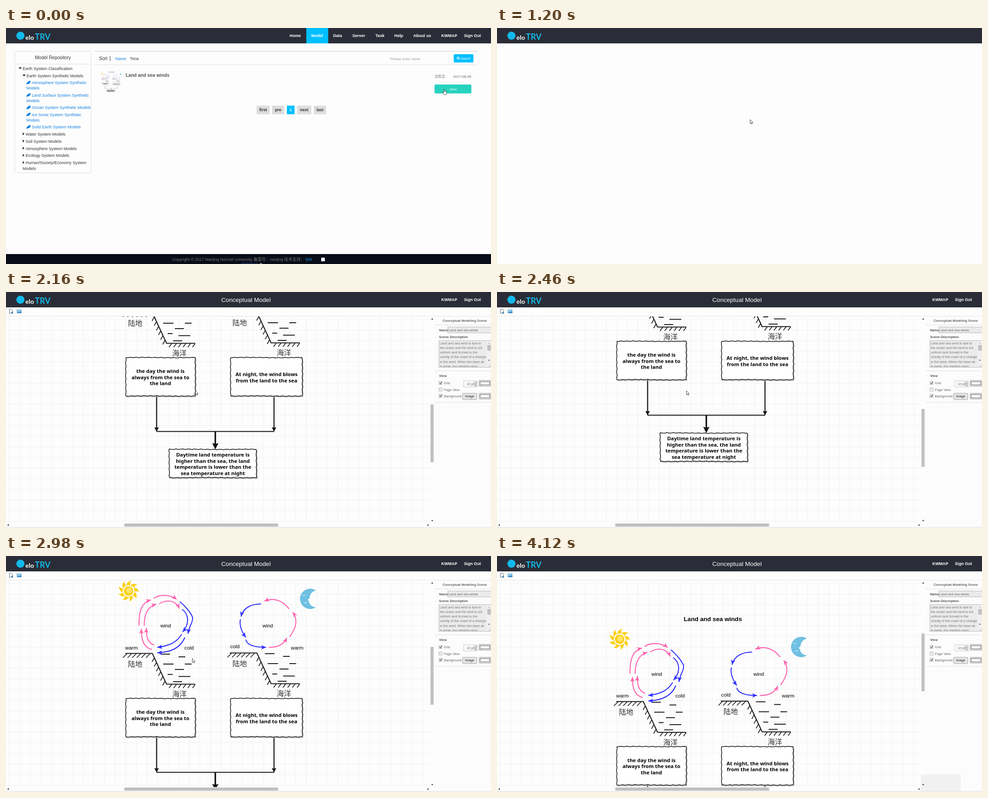
Write an HTML page that moves like this. It is 1074 by 522 pixels and loops after 4590 ms.

```html
<!DOCTYPE html>
<html lang="en">
<head>
<meta charset="utf-8">
<title>Conceptual model viewer</title>
<style>
html, body { margin: 0; width: 100%; height: 100%; overflow: hidden; background: #fdfdfd; }
svg { display: block; width: 1074px; height: 522px; font: 9.05px Arial, "Liberation Sans", "Noto Sans CJK SC", sans-serif; }
.b { font-weight: bold; }
.m { text-anchor: middle; }
.s7 { font-size: 7.35px; }
.s8 { font-size: 7.92px; }
.s10 { font-size: 10.2px; }
.s11 { font-size: 11.3px; }
.s13 { font-size: 13.57px; }
.hand { font: bold 11.3px "Noto Sans", sans-serif; text-anchor: middle; }
.cjk { font: 500 16px "Noto Sans CJK SC", "Noto Sans CJK", sans-serif; }
</style>
</head>
<body>
<svg id="stage" viewBox="0 0 1074 522"></svg>
<script>
const CYAN = '#00bfff', LINK = '#1580e0', PINK = '#ff5fae', BLUE = '#2d2dff';

const text = (x, y, str, cls = '', fill = '#333') => `<text x="${x}" y="${y}" class="${cls}" fill="${fill}">${str}</text>`;
const rect = (x, y, w, h, fill, extra = '') => `<rect x="${x}" y="${y}" width="${w}" height="${h}" fill="${fill}" ${extra}/>`;
const path = (d, fill, stroke = 'none', w = 1, extra = '') =>
  `<path d="${d}" fill="${fill}" stroke="${stroke}" stroke-width="${w}" ${extra}/>`;
const line = (d, stroke, w = 1, extra) => path(d, 'none', stroke, w, extra);
const group = (id, body, extra = '') => `<g id="${id}" ${extra}>${body}</g>`;
const marker = (id, fill) =>
  `<marker id="${id}" markerUnits="userSpaceOnUse" markerWidth="12" markerHeight="12" refX="11" refY="5.5" orient="auto">
   <path d="M11 5.5L0 .7 3 5.5 0 10.3Z" fill="${fill}"/></marker>`;
const times = (n, fn) => Array.from({ length: n }, (_, i) => fn(i)).join('');

const header = rect(0, 0, 1074, 34, '#2a2d37')
  + `<circle cx="32" cy="17" r="9" fill="#12b9ea"/>`
  + `<g font-family="Lato, sans-serif" font-weight="bold"><text x="43" y="26" font-size="14" fill="#fff">elo</text>
     <text x="64" y="26" font-size="18" fill="#12b9ea">TRV</text></g>`;
const account = text(964, 20, 'KWMAP', 'b', '#fff') + text(1014, 20, 'Sign Out', 'b', '#fff');

function listPage() {
  const nav = [['Home', 628], ['Model', 676], ['Data', 724.5], ['Server', 767], ['Task', 818], ['Help', 860], ['About us', 902]];
  const leaves = [
    [124, 'Atmosphere System Synthetic', 'Models'], [151.5, 'Land Surface System Synthetic', 'Models'],
    [179, 'Ocean System Synthetic Models'], [194.5, 'Ice Snow System Synthetic', 'Models'], [222, 'Solid Earth System Models']];
  const closed = ['Water System Models', 'Soil System Models', 'Atmosphere System Models', 'Ecology System Models', 'Human/Society/Economy System'];
  const pages = [['first', 555, 29], ['pre', 589, 27], ['1', 622, 17], ['next', 644.5, 31.5], ['last', 681.5, 27.5]];
  return rect(0, 0, 1074, 522, '#fdfdfd') + header + rect(665, 0, 48.5, 34, CYAN)
    + nav.map(([s, x]) => text(x, 20, s, 'b', '#fff')).join('') + account
    + rect(19.5, 51.5, 169, 269, 'none', 'stroke="#ddd" rx="2"') + line('M20 80H188', '#ddd')
    + text(104, 69, 'Model Repository', 'm s10')
    + path('M28 87h7l-3.5 4zM36.5 103h7l-3.5 4z', '#222')
    + text(37, 92.5, 'Earth System Classification') + text(45.5, 108.5, 'Earth System Synthetic Models')
    + leaves.map(([y, a, b]) => path(`M45 ${y}q1-6 9.5-7.5q0 7-6 7.5q-2 0-3 1z`, LINK)
      + text(57, y, a, '', LINK) + (b ? text(45, y + 12.2, b, '', LINK) : '')).join('')
    + closed.map((s, i) => path(`M37 ${231 + i * 15.8}v6.4l3.6-3.2z`, '#222') + text(43.5, 238 + i * 15.8, s)).join('')
    + text(37, 313.5, 'Models')
    + line('M197 51.5H1044', '#ccc') + line('M197 81.2H1044', '#ddd')
    + text(206, 70.5, 'Sort', 's10') + line('M230.5 62V73', '#333')
    + text(242, 70.5, 'Name', '', LINK) + text(274.5, 70.5, 'Time')
    + text(851, 70.5, 'Please enter name', 's8', '#999')
    + rect(991.5, 58, 43.5, 18.3, CYAN, 'rx="2"') + line('M1002.6 68l2 2', '#fff', 1.5)
    + '<circle cx="1001" cy="66.3" r="2.2" fill="none" stroke="#fff" stroke-width="1.2"/>'
    + text(1007, 69.5, 'Search', '" font-size="6.8', '#fff')
    + '<use href="#diagram" transform="matrix(.104 0 0 .0806 184.4 90.8)"/>'
    + text(265, 107.5, 'Land and sea winds', 'b s10', '#555')
    + text(949, 109.5, '沈知言', 's8', '#777') + text(990, 109.5, '2017-08-05', 's8', '#666')
    + rect(949, 125, 81.5, 19.7, '#27d2bf', 'rx="2"') + text(990, 137.8, 'View', 'm s8', '#fff')
    + pages.map(([s, x, w]) => rect(x, 171.7, w, 19, s === '1' ? CYAN : '#ddd')
      + text(x + w / 2, 184.3, s, 'm b', s === '1' ? '#fff' : '#333')).join('')
    + rect(0, 500, 1074, 22, '#090d18')
    + text(368, 514.5, 'Copyright © 2017 Nanjing Normal University 备案号：nanjing 技术支持：', '', '#777')
    + text(663, 514.5, '506', '', '#1a90e0') + rect(698, 508, 8, 8, '#fff')
    + text(521, 528, '回到顶部', '', '#2a6fc8') + path('M561 522l3.5-2 3.5 2z', '#ccc');
}

// Hand-drawn frame: edges waver slightly around a rectangle
function sketchBox(x, y, w, h) {
  const pts = [], wave = v => .7 * Math.sin(v * .45) + .3 * Math.sin(v * 1.3);
  const edge = (x0, y0, dx, dy, len) => {
    for (let d = 0; d < len; d += 5) pts.push([x0 + dx * d + dy * wave(d + x), y0 + dy * d + dx * wave(d + y)]);
  };
  edge(x, y, 1, 0, w); edge(x + w, y, 0, 1, h); edge(x + w, y + h, -1, 0, w); edge(x, y + h, 0, -1, h);
  const d = 'M' + pts.map(p => p.map(v => v.toFixed(1)).join(' ')).join('L') + 'Z';
  return line(d, '#bbb', 1.5, 'transform="translate(1.5 1.8)"') + path(d, '#fff', '#111', 1.5);
}

function coast() {
  const dashes = ['342 267h21', '382 273h15', '348 289h23', '396 289h15', '374 301h20', '358 312h11', '382 316.5h26', '370 328h20'];
  return line('M264 265.5H324L355.5 333.5H419', '#1c1c1c', 2.2)
    + line(times(6, i => `M${268 + i * 10.2} 266l-9 9`) + times(6, i => `M${367 + i * 10.4} 334l-6 8`)
      + times(6, i => `M${328.5 + i * 4.7} ${275 + i * 10.4}l-5 9`), '#1c1c1c', 1.7)
    + line(dashes.map(d => 'M' + d).join(''), '#1c1c1c', 2)
    + text(270, 294.5, '陆地', 'cjk') + text(368, 361, '海洋', 'cjk');
}

function diagram() {
  const pink = ['M294.5 204C294 172 300 153 321 147', 'M306 204C306 182 311 163 333 156.5', 'M327 144C338 135 362 134 378 146',
    'M339 156C352 147 374 145 384 166', 'M323 257C306 252 299 238 300 211', 'M328 247C314 243 310 228 311 209',
    'M582 252C602 252 614 247 622 231', 'M628 229C643 208 647 192 635 174', 'M627 167C612 147 592 142 572 149.5'];
  const blue = ['M385 151C396 160 408 174 413 185Q414 190 411 198Q405 210 403 222', 'M390 168C404 178 408 199 391 218',
    'M396 230C388 250 370 263 335 264', 'M389 223C378 242 360 249 335 252', 'M565 156C544 156 525 164 520.5 184',
    'M519 190C516 206 523 219 531 230', 'M531 235C534 249 555 252 576 252'];
  const arrows = (list, color, id) => list.map(d => line(d, color, 2.1, `marker-end="url(#${id})"`)).join('');
  const lines = (x, y, list) => list.map((s, i) => text(x, y + i * 13.6, s, 'hand', '#000')).join('');
  const drop = x => line(`M${x} 450V520`, '#111', 2.3) + path(`M${x} 529l-5-10q5 2 10 0z`, '#111');
  return text(478, 87.5, 'Land and sea winds', 'm b s13', '#000')
    + '<g transform="translate(271.5 127.5)">'
    + times(9, i => path('M-5-12Q-5-20 6-23Q2-17 4-12Q0-14-5-12Z', '#fbd012', 'none', 0, `transform="rotate(${i * 40})"`))
    + '<circle r="10.5" fill="#fbd012"/><circle cx="1" cy="-1" r="6.5" fill="#ffe36b"/></g>'
    + path('M686 126A22.5 22.5 0 1 0 686 163.500Q672 161 671 150L668 147 672 143Q673 130 686 126Z', '#6fc0e2')
    + line('M656 136q4 3 7 0M660 153q4 2 7-1', '#d8f0fa', 1.2)
    + coast() + `<g transform="translate(231.5 -1)">${coast()}</g>`
    + arrows(pink, PINK, 'pinkHead') + arrows(blue, BLUE, 'blueHead')
    + [[342, 208, 'wind'], [264, 256.5, 'warm'], [395, 256.5, 'cold'], [568, 208, 'wind'], [496.5, 254, 'cold'], [631, 256.5, 'warm']]
      .map(([x, y, s]) => text(x, y, s, 's11', '#000')).join('')
    + drop(333.5) + drop(593.5) + line('M333 528.5H594', '#111', 2)
    + line('M463.500 528V558', '#111', 3.4) + path('M463.500 568l-7-14q7 3 14 0z', '#111')
    + sketchBox(265.5, 365, 153.5, 85) + sketchBox(497.5, 365, 158.5, 85) + sketchBox(361.5, 568, 193, 62.5)
    + lines(342, 399, ['the day the wind is', 'always from the sea to', 'the land'])
    + lines(577, 406, ['At night, the wind blows', 'from the land to the sea'])
    + lines(458, 584, ['Daytime land temperature is', 'higher than the sea, the land', 'temperature is lower than the', 'sea temperature at night']);
}

function panel() {
  const about = ['Land and sea wind is due to', 'the ocean and the land is not', 'uniform and formed in the',
    'vicinity of the coast of a change', 'in the wind. When the base air', 'is weak, the daytime wind'];
  const box = (x, y, w, h, fill, stroke = '#aaa', rx = 0) => rect(x, y, w, h, fill, `stroke="${stroke}" stroke-width=".8" rx="${rx}"`);
  const check = (y, label, on) => box(959, y, 6.500, 6.500, '#fff', '#888')
    + (on ? line(`M960.3 ${y + 3.2}l1.700 1.800 2.800-4`, '#333', 1.2) : '') + text(969.5, y + 6.2, label, 's7', '#666');
  return rect(948, 54, 126, 466, '#fcfcfc') + line('M949 73H1074M949 174.500H1074M949 244H1074', '#ddd')
    + text(967, 66, 'Conceptual Modeling Scene', 'b s7', '#666')
    + text(959, 87, 'Name', 'b s7', '#555') + box(978.5, 77.5, 100, 13, '#ebebeb') + text(980, 86.5, 'Land and sea winds', 's7', '#666')
    + text(959, 102, 'Scene Description', 'b s7', '#555') + box(958.5, 107.5, 120, 59, '#ebebeb')
    + `<g clip-path="url(#noteClip)">${about.map((s, i) => text(960.5, 115.700 + i * 10.2, s, 's7', '#777')).join('')}</g>`
    + rect(1065, 108, 9, 58, '#f1f1f1') + rect(1066, 117, 7.5, 13, '#c1c1c1')
    + path('M1067.500 114h4l-2-2.500z', '#aaa') + path('M1067.500 150h4l-2 2.500z', '#444') + line('M1068 165l5-5m-2 5l2-2', '#999', .7)
    + text(959, 188, 'View', 'b s7', '#555') + check(198, 'Grid', 1) + check(212.5, 'Page View', 0) + check(226.5, 'Background', 1)
    + box(1013.5, 196.5, 30, 13.5, '#fafafa', '#bbb') + text(1020, 206, '10 pt', 's7', '#666')
    + box(1036.5, 198.5, 6, 10, '#eee', '#bbb') + path('M1038 202.500h3.400l-1.700-2.200zM1038 205h3.400l-1.700 2.200z', '#555')
    + box(1011, 224, 31.5, 14, '#e6e6e6', '#888', 1.5) + text(1026.7, 233.2, 'Image', 'm s7', '#222')
    + [195.5, 224].map(y => box(1047.5, y, 26, 13, '#eee', '#888', 1.5) + box(1050, y + 2.7, 21, 7.500, '#f7f7f7', '#333')).join('');
}

function editor() {
  const grid = times(41, i => `M${(6.5 + i * 23.5).toFixed(1)} 54V511`) + times(20, i => `M0 ${(60.5 + i * 23.5).toFixed(1)}H939`);
  return rect(0, 34, 1074, 488, '#fdfdfd') + line('M0 53.500H1074', '#e4e4e4')
    + path('M7.500 38h4.500l2.500 2.500v6.500h-7z', '#fff', '#555', .9) + line('M13.500 43.500v4.500M11.200 45.700h4.600', '#1f7fc0', 1.3)
    + rect(24, 39, 10, 7.500, '#8ccbf2', 'stroke="#8aa" stroke-width=".6"') + path('M24 46.500l3-3 2 1.500 3-2.500 2 2v2z', '#2c7fc4')
    + line(grid, '#f1f1f1') + rect(939, 54, 9, 457, '#fdfdfd')
    + path('M941.500 61h4.600l-2.300-3zM941.500 504.500h4.600l-2.300 3zM6 513.300v4.600l-3-2.300zM933.500 513.300v4.600l3-2.300z', '#333')
    + rect(262, 512, 340.5, 7, '#c1c1c1') + line('M0 520.500H1074', '#dcdcdc')
    + panel();
}

const stage = document.getElementById('stage');
stage.innerHTML = `<defs>${marker('pinkHead', PINK)}${marker('blueHead', BLUE)}
  <clipPath id="viewClip">${rect(0, 54, 939, 457, '#000')}</clipPath>
  <clipPath id="noteClip">${rect(959, 108, 106, 58, '#000')}</clipPath></defs>`
  + rect(0, 0, 1074, 522, '#fdfdfd')
  + group('editorBar', header)
  + group('editor', editor() + text(531.5, 21.5, 'Conceptual Model', 'm s13', '#fff') + account)
  + group('view', group('diagram', diagram()), 'clip-path="url(#viewClip)"')
  + rect(940, 187, 7, 128, '#c1c1c1', 'id="thumb"')
  + group('list', listPage())
  + rect(939, 483, 88, 37, '#000', 'id="patch" opacity=".045"')
  + group('arrow', path('M.5.5V9.300L2.500 7.500 4 10.600 5.300 10 4 7H6.700Z', '#fff', '#222', .8))
  + group('pointer', path('M3.500 1Q4.500 0 5.300 1V5L9 6Q10 6.500 9.600 8.500L8.500 12.500H4L1 8.500Q.5 7 1.800 7L3.500 8.500Z', '#fff', '#222', .8));

// time, cursor x, cursor y, diagram scroll
const STEPS = [
  [0, 966, 135, 0], [150, 965, 140, 0], [1070, 800, 160, 0], [1200, 560, 202, 0], [1350, 428, 206, 0],
  [1710, 400, 200, 0], [1860, 404, 204, 0], [2010, 419, 218, 0], [2160, 419, 218, -220], [2310, 419, 218, -240],
  [2460, 419, 218, -256], [2610, 424, 221, -200], [2730, 428, 224, -125], [2860, 412, 226, -50], [2990, 392, 228, 20],
  [3110, 378, 229, 56.5], [3250, 610, 353, 56.5], [3400, 680, 370, 56.5], [3520, 762, 389, 56.5],
  [3670, 837, 426, 56.5], [3820, 923, 483, 56.5], [3970, 1020, 509, 56.5]];
const LOOP = 4590;

const el = id => document.getElementById(id);
const show = (id, on) => { el(id).style.display = on ? '' : 'none'; };
const move = (id, x, y) => el(id).setAttribute('transform', `translate(${x} ${y})`);

function draw(now) {
  const t = now % LOOP;
  const [, x, y, scroll] = STEPS.filter(s => s[0] <= t).pop();
  show('list', t < 570);
  show('editorBar', t >= 1070);
  show('editor', t >= 1350);
  show('thumb', t >= 1350);
  show('view', t >= 1470);
  show('patch', t >= 3970);
  show('pointer', t < 150);
  show('arrow', t >= 150 && t < 4120);
  move('arrow', x, y);
  move('pointer', x, y);
  // The list thumbnail reuses the diagram, so it only scrolls with the editor
  move('diagram', 0, scroll);
  move('thumb', 0, -scroll * .28);
}

const start = performance.now();
function tick() {
  draw(performance.now() - start);
  requestAnimationFrame(tick);
}
tick();
</script>
</body>
</html>
```
